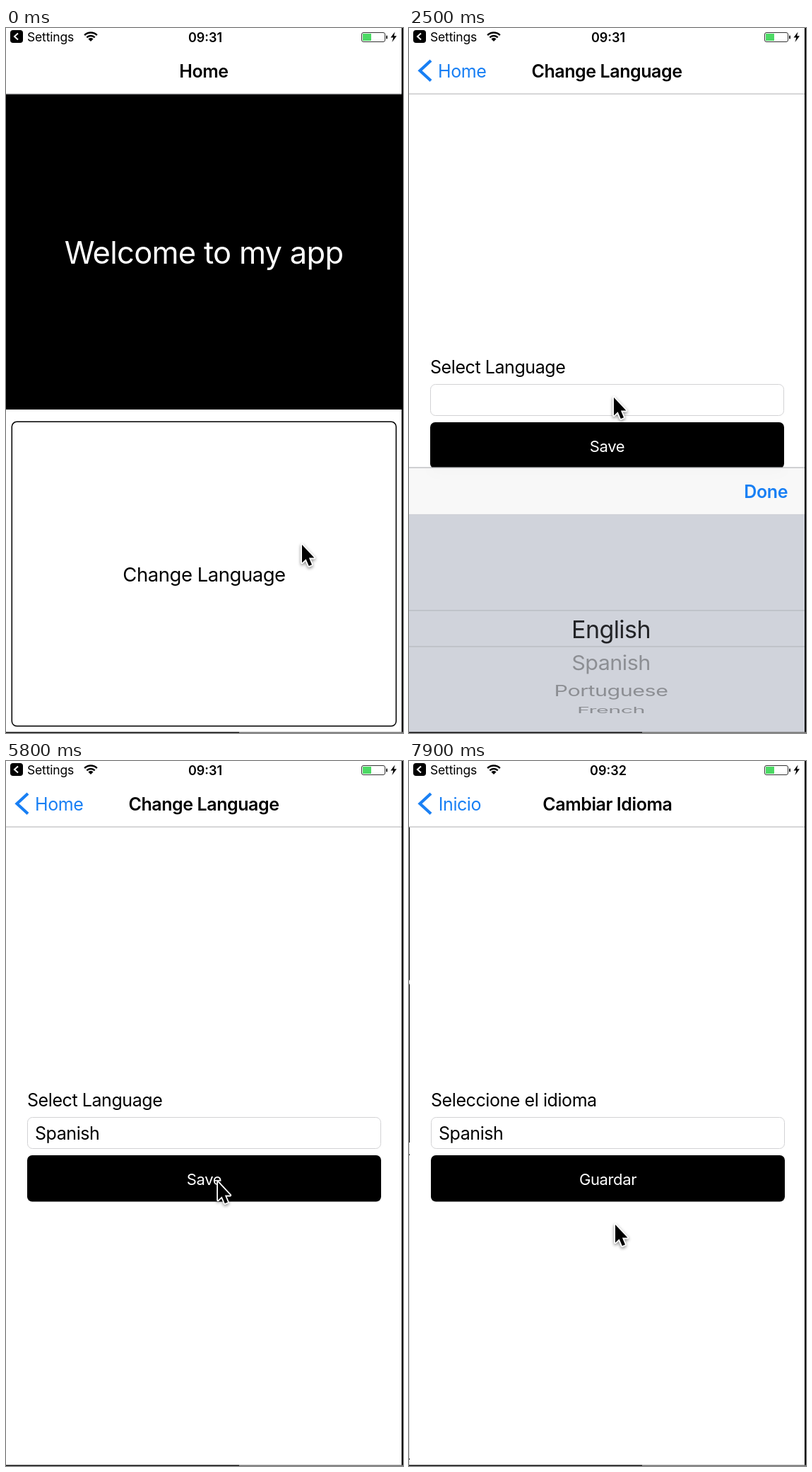
Animation, 562 px wide and 996 px high, one loop 8 s. Source, as an HTML page with a canvas:

```html
<!DOCTYPE html>
<html lang="en">
<head>
<meta charset="utf-8">
<title>Change language</title>
<style>
  html, body { margin: 0; width: 100%; height: 100%; overflow: hidden; background: #fff; }
  canvas { display: block; width: 562px; height: 996px; }
</style>
</head>
<body>
<canvas id="stage" width="562" height="996"></canvas>
<script>
const ctx = document.getElementById('stage').getContext('2d');
const LOOP = 8, STEP = 0.1;
const WIDTH = 560, HEIGHT = 996;
const BLUE = '#187ff4';
const SAVED = 6.1, SECOND_PUSH = 7.4;

const EN = {
  home: 'Home', welcome: 'Welcome to my app', change: 'Change Language',
  select: 'Select Language', save: 'Save'
};
const ES = {
  home: 'Inicio', welcome: 'Bienvenido a mi aplicación', change: 'Cambiar Idioma',
  select: 'Seleccione el idioma', save: 'Guardar'
};
const LANGUAGES = ['English', 'Spanish', 'Portuguese', 'French'];

// Each key: time, then values.
const CURSOR = [
  [0, 419, 730], [0.1, 421, 731], [1.1, 421, 731], [1.3, 339, 595], [1.7, 290, 522],
  [2.5, 290, 522], [3.2, 392, 813], [3.3, 392, 813], [3.7, 391, 770], [4.2, 391, 770],
  [4.8, 505, 635], [5.2, 505, 635], [5.8, 300, 595], [6.6, 300, 595], [6.7, 433.5, 499],
  [6.8, 390, 380], [6.9, 310, 520], [7, 289, 711], [7.1, 292, 655]
];
const WHEEL = [[3.3, 0], [3.7, 0.89], [4.3, 1]];
const PRESS = [[0.4, 1], [0.5, 0.25], [0.55, 0.3], [0.7, 0.65], [0.9, 1]];

const clamp = v => Math.min(1, Math.max(0, v));

// Monotone cubic through the keys: flows through moving keys, rests at turns.
function track(keys, t) {
  const last = keys.length - 1;
  if (t <= keys[0][0]) return keys[0].slice(1);
  if (t >= keys[last][0]) return keys[last].slice(1);
  const n = keys.findIndex(k => k[0] > t) - 1;
  const slope = (i, c) => i < 0 || i >= last ? 0
    : (keys[i + 1][c] - keys[i][c]) / (keys[i + 1][0] - keys[i][0]);
  const tangent = (i, c) => {
    const a = slope(i - 1, c), b = slope(i, c);
    return a * b > 0 ? 2 * a * b / (a + b) : 0;
  };
  const from = keys[n], to = keys[n + 1], span = to[0] - from[0];
  const p = (t - from[0]) / span, r = 1 - p;
  return from.slice(1).map((v, i) => {
    const c = i + 1;
    return v * (1 + 2 * p) * r * r + to[c] * p * p * (3 - 2 * p)
      + span * p * r * (tangent(n, c) * r - tangent(n + 1, c) * p);
  });
}

// Critically damped spring falling from 1 to 0.
function spring(t) {
  if (t <= 0) return 1;
  const q = (1 + 17 * t) * Math.exp(-17 * t);
  return q < 0.0012 ? 0 : q;
}

const decay = t => t <= 0 ? 1 : Math.exp(-32 * t);

function setFont(size, weight, tracking) {
  ctx.font = `${weight} ${size}px Inter, Roboto, sans-serif`;
  ctx.letterSpacing = `${size * tracking}px`;
}

// y is the middle of the capitals.
function text(str, x, y, size, { color = '#000', weight = 400, align = 'left', alpha = 1, tracking = -0.017 } = {}) {
  ctx.save();
  setFont(size, weight, tracking);
  ctx.globalAlpha *= clamp(alpha);
  ctx.fillStyle = color;
  ctx.textAlign = align;
  ctx.fillText(str, x, y + size * 0.364);
  ctx.restore();
}

function rect(x, y, w, h, color) {
  ctx.fillStyle = color;
  ctx.fillRect(x, y, w, h);
}

function rounded(x, y, w, h, r, fill, stroke, line = 1) {
  ctx.beginPath();
  ctx.roundRect(x, y, w, h, r);
  if (fill) { ctx.fillStyle = fill; ctx.fill(); }
  if (stroke) { ctx.strokeStyle = stroke; ctx.lineWidth = line; ctx.stroke(); }
}

function trace(points) {
  ctx.beginPath();
  points.forEach(([x, y]) => ctx.lineTo(x, y));
}

function polyline(points, color, width) {
  trace(points);
  ctx.strokeStyle = color;
  ctx.lineWidth = width;
  ctx.stroke();
}

function statusBar(clock) {
  rounded(6, 3, 18, 18, 4, '#000');
  polyline([[17, 7.5], [12, 12], [17, 16.5]], '#fff', 2);
  text('Settings', 30, 12.5, 17.5, { tracking: -0.01 });

  const fan = [-Math.PI * 0.75, -Math.PI * 0.25];
  ctx.beginPath();
  ctx.moveTo(120, 19);
  ctx.arc(120, 19, 5, ...fan);
  ctx.fillStyle = '#000';
  ctx.fill();
  for (const r of [8, 12.5]) {
    ctx.beginPath();
    ctx.arc(120, 19, r, ...fan);
    ctx.strokeStyle = '#000';
    ctx.lineWidth = 2.4;
    ctx.stroke();
  }

  text(clock, 282, 13, 18, { weight: 600, align: 'center', tracking: 0 });
  rounded(503.5, 6.5, 33, 13, 2.5, '#fff', '#333');
  rect(505, 8, 12, 10, '#4cd964');
  rounded(538, 10.5, 2, 5, 1, '#222');
  trace([[550.5, 5.5], [544.5, 13.5], [548.3, 13.5], [546.5, 20], [553, 11.3], [549.2, 11.3]]);
  ctx.fillStyle = '#000';
  ctx.fill();
}

function header(words, q) {
  rect(0, 0, WIDTH, 93, '#fff');
  rect(0, 92.5, WIDTH, 1.2, '#bcbcbe');
  setFont(25, 600, -0.017);
  const titleLeft = WIDTH / 2 - ctx.measureText(words.home).width / 2;
  const left = 41 + (titleLeft - 41) * q ** 0.9;
  text(words.home, left, 60.5, 25, { weight: 600, alpha: q ** 1.4 });
  if (q === 1) return;
  text(words.home, left, 60.5, 25, { color: BLUE, alpha: 1 - q });
  text(words.change, 280 + 445 * q, 60.5, 25, { weight: 600, align: 'center', alpha: 1 - 1.2 * q });
  ctx.save();
  ctx.globalAlpha = clamp(1 - 4 * q);
  polyline([[31, 46], [15.5, 60.3], [31, 74.5]], BLUE, 4.2);
  ctx.restore();
}

function homePage(words, q, pressAlpha) {
  const shade = 1 - q;
  ctx.save();
  ctx.translate(-0.3 * WIDTH * shade, 0);
  rect(0, 93, WIDTH, 903, '#fff');
  rect(0, 93, WIDTH, 446, '#000');
  text(words.welcome, 280, 317.5, 43.5, { color: '#fff', align: 'center' });
  rounded(8.3, 556.3, 544, 430, 7, '#fff', '#000', 1.5);
  text(words.change, 280.5, 771.5, 27.5, { align: 'center', alpha: pressAlpha });
  ctx.restore();
  rect(0, 93, WIDTH, 903, `rgba(0,0,0,${0.1 * shade})`);
}

function formPage(words, q, value, pressAlpha) {
  ctx.save();
  ctx.translate(Math.round(WIDTH * q), 0);
  ctx.save();
  ctx.shadowColor = 'rgba(0,0,0,0.15)';
  ctx.shadowBlur = 6;
  rect(0, 93, WIDTH, 903, '#fff');
  ctx.restore();
  text(words.select, 30, 479, 25);
  rounded(30.5, 503.5, 500, 44, 7, '#fff', '#d2d2d4');
  text(value, 41, 525.5, 25);
  rounded(30, 557, 501, 65.5, 7, '#000');
  text(words.save, 280.5, 591, 22, { color: '#fff', align: 'center', alpha: pressAlpha });
  ctx.restore();
}

function wheelRows(top, pos, size, color) {
  LANGUAGES.forEach((name, i) => {
    const angle = (i - pos) * 0.388;
    ctx.save();
    ctx.translate(286, top + 228.5 + 124 * Math.sin(angle));
    ctx.scale(1, Math.cos(angle));
    text(name, 0, 0, size, { color, align: 'center' });
    ctx.restore();
  });
}

function picker(top, pos) {
  rect(0, top, WIDTH, HEIGHT - top, '#d0d3db');
  rect(0, top, WIDTH, 66, '#f8f8f8');

  // The black button glows faintly through the translucent toolbar.
  if (top < 623) {
    ctx.save();
    ctx.beginPath();
    ctx.rect(0, top, WIDTH, 66);
    ctx.clip();
    ctx.filter = 'blur(9px)';
    rect(30, top, 501, 623 - top, 'rgba(0,0,0,0.1)');
    ctx.restore();
  }
  rect(0, top - 0.5, WIDTH, 1.2, '#b5b5b8');
  rect(0, top + 66, WIDTH, 1, '#cfd1d6');
  text('Done', 536, top + 34, 25, { color: BLUE, weight: 600, align: 'right' });

  const band = new Path2D(), outside = new Path2D();
  band.rect(0, top + 202, WIDTH, 51);
  outside.rect(0, top + 67, WIDTH, 135);
  outside.rect(0, top + 253, WIDTH, 160);
  ctx.save();
  ctx.clip(outside);
  wheelRows(top, pos, 30.5, '#8c8e93');
  ctx.restore();
  ctx.save();
  ctx.clip(band);
  wheelRows(top, pos, 34, '#222326');
  ctx.restore();
  rect(0, top + 201.5, WIDTH, 1, '#b0b3b9');
  rect(0, top + 252.5, WIDTH, 1, '#b0b3b9');
}

function cursor(x, y) {
  ctx.save();
  ctx.translate(x, y);
  ctx.lineJoin = 'round';
  trace([[0, 0], [0, 25.5], [5.6, 20.2], [9.8, 30], [14, 28.2], [9.9, 18.6], [17.4, 18.6]]);
  ctx.closePath();
  ctx.save();
  ctx.shadowColor = 'rgba(0,0,0,0.45)';
  ctx.shadowBlur = 4;
  ctx.shadowOffsetY = 2;
  ctx.strokeStyle = '#fff';
  ctx.lineWidth = 3.6;
  ctx.stroke();
  ctx.restore();
  ctx.fillStyle = '#000';
  ctx.fill();
  ctx.restore();
}

// Share of the form page still off to the right; saving cuts straight back home.
const pageOffset = t => spring(t < SAVED ? t - 0.534 : t - SECOND_PUSH);

const pickerTop = t => 605 + 391 * (decay(t - 2.4) + 1 - decay(t - 5.15));

function draw(t) {
  const words = t < SAVED ? EN : ES;
  const q = pageOffset(t);
  const homePress = track(PRESS, t < SAVED ? t : t - 6.9)[0];
  const savePress = track(PRESS, t - 5.4)[0];
  const top = pickerTop(t);

  ctx.clearRect(0, 0, 562, HEIGHT);
  if (q > 0) homePage(words, q, homePress);
  if (q < 1) formPage(words, q, t < 4.4 ? '' : 'Spanish', savePress);
  if (top < HEIGHT - 2) picker(top, track(WHEEL, t)[0]);
  header(words, q);
  statusBar(t < SECOND_PUSH ? '09:31' : '09:32');
  rect(WIDTH, 0, 2, HEIGHT, '#000');
  rect(0, 994.5, 330, 1.5, '#111');
  rect(330, 994.5, 232, 1.5, '#777');
  cursor(...track(CURSOR, t));
}

function tick() {
  const t = (performance.now() / 1000) % LOOP;
  draw(Math.floor(t / STEP + 1e-6) / 10);
  requestAnimationFrame(tick);
}
tick();
</script>
</body>
</html>
```
